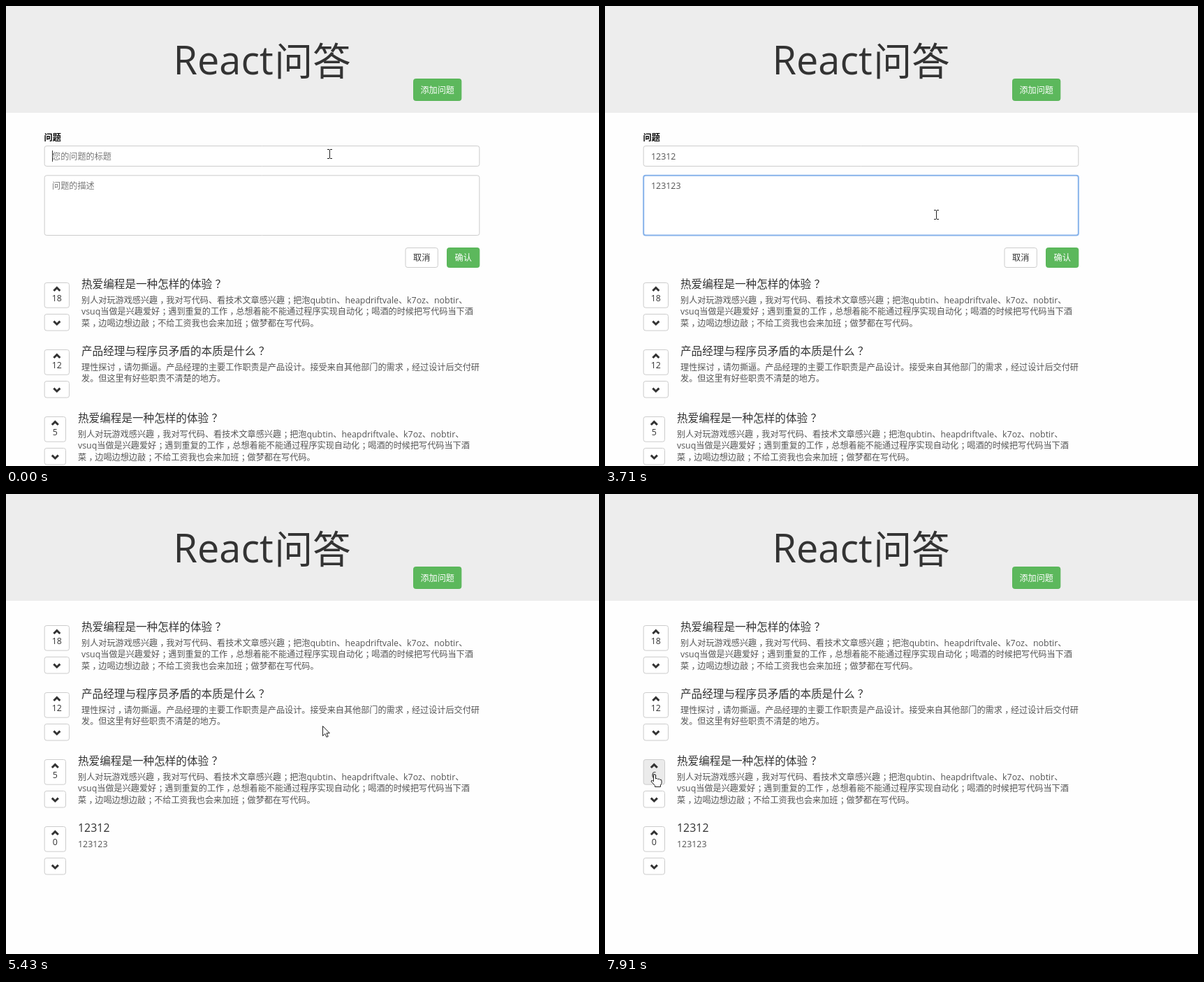
Write an HTML page with a canvas that moves like this. It is 849 px wide and 659 px high and loops after 8000 ms.

```html
<!DOCTYPE html>
<html lang="zh-CN">
<head>
<meta charset="utf-8">
<title>React问答</title>
<style>
html, body { margin: 0; width: 100%; height: 100%; overflow: hidden; background: #fefefe; }
canvas { display: block; }
</style>
</head>
<body>
<canvas id="stage" width="849" height="659"></canvas>
<script>
const ctx = document.getElementById('stage').getContext('2d');
const LOOP = 8000, SENT = 4770, BODY = 12.13, HEAD = 15.6, LEFT = 55.2;
const LATIN = '"Open Sans", "Noto Sans", sans-serif';
const HAN = '"Noto Sans CJK SC", "Noto Sans CJK", sans-serif';

const hobby = ['热爱编程是一种怎样的体验？', [
  '别人对玩游戏感兴趣，我对写代码、看技术文章感兴趣；把泡qubtin、heapdriftvale、k7oz、nobtir、',
  'vsuq当做是兴趣爱好；遇到重复的工作，总想着能不能通过程序实现自动化；喝酒的时候把写代码当下酒',
  '菜，边喝边想边敲；不给工资我也会来加班；做梦都在写代码。']];
const roles = ['产品经理与程序员矛盾的本质是什么？', [
  '理性探讨，请勿撕逼。产品经理的主要工作职责是产品设计。接受来自其他部门的需求，经过设计后交付研',
  '发。但这里有好些职责不清楚的地方。']];
const added = ['12312', ['123123']];

// Pointer moves: first step, last step, step count, waypoints
const moves = [
  [0, 0, 1, [[463, 212]]],
  [640, 1020, 4, [[463, 212], [463, 230]]],
  [1170, 1610, 4, [[463, 230], [446, 289]]],
  [3710, 4630, 7, [[446, 289], [644, 361]]],
  [SENT, SENT, 1, [[643, 361]]],
  [5070, 6010, 8, [[643, 361], [480, 324], [260, 385], [92, 485]]],
  [6130, 6270, 2, [[92, 485], [37, 330]]],
  [6409, 7100, 6, [[37, 330], [36, 275], [52, 232], [66, 295], [74, 358]]],
  [7240, 7240, 1, [[69, 401]]]
];

function pointer(t) {
  const [from, to, count, pts] = moves.filter(m => m[0] <= t).pop();
  const gap = (to - from) / (count - 1) || 1;
  const step = Math.min(count, Math.floor((t - from) / gap + 1e-6) + 1);
  const p = step / count * (pts.length - 1);
  const i = Math.max(0, Math.min(pts.length - 2, Math.floor(p)));
  const a = pts[i], b = pts[i + 1] || a;
  return a.map((v, k) => v + (b[k] - v) * (p - i));
}

// Draws mixed text: Latin runs slightly larger than Han, and the marks ，；？
// centred in their cells. Returns the width.
function text(s, x, y, size, color, { weight = 400, center = false } = {}) {
  const runs = s.match(/[\x20-\x7e]+|[，；？]|[^\x20-\x7e，；？]+/g) || [];
  const fontOf = r => r.charCodeAt(0) < 127
    ? `${weight} ${size * 1.023}px ${LATIN}` : `${weight} ${size}px ${HAN}`;
  const widths = runs.map(r => (ctx.font = fontOf(r), ctx.measureText(r).width));
  const total = widths.reduce((a, b) => a + b, 0);
  if (center) x -= total / 2;
  ctx.fillStyle = color;
  runs.forEach((r, i) => {
    ctx.font = fontOf(r);
    ctx.fillText(r, x + (/[，；？]/.test(r) ? size * .28 : 0), y);
    x += widths[i];
  });
  return total;
}

function box(x, y, w, h, fill = '#fff', line = '#ccc', width = 1) {
  ctx.beginPath();
  ctx.roundRect(x, y, w, h, 3);
  ctx.fillStyle = fill;
  ctx.fill();
  ctx.strokeStyle = line;
  ctx.lineWidth = width;
  ctx.stroke();
}

function button(label, x, y, w, h, green) {
  box(x, y, w, h, green ? '#5cb85c' : '#fff', green ? '#58b558' : '#ccc');
  text(label, x + w / 2, y + h / 2 + 4.6, BODY, green ? '#fff' : '#333', { center: true });
}

function chevron(x, y, dir) {
  ctx.beginPath();
  ctx.moveTo(x - 4.5, y + 2.2 * dir);
  ctx.lineTo(x, y - 2.2 * dir);
  ctx.lineTo(x + 4.5, y + 2.2 * dir);
  ctx.strokeStyle = '#333';
  ctx.lineWidth = 3;
  ctx.stroke();
}

function row([title, lines], votes, y, right, pressed) {
  const w = right - LEFT, mid = LEFT + w / 2, x = right + 17.5;
  box(LEFT, y + 188.5, w, 35.7, pressed ? '#ebebeb' : '#fff');
  chevron(mid, y + 197.8, 1);
  text(String(votes), mid, y + 215.3, BODY, '#333', { center: true });
  box(LEFT, y + 233.5, w, 23.5);
  chevron(mid, y + 245.8, -1);
  text(title, x, y + 196, HEAD, '#333');
  lines.forEach((s, i) => text(s, x, y + 217.5 + 16.5 * i, BODY, '#555'));
}

function field(value, hint, y, caret) {
  const w = text(value || hint, 66, y, BODY, value ? '#555' : '#777');
  if (!caret) return;
  ctx.fillStyle = '#333';
  ctx.fillRect(66 + Math.round(value && w), y - 12.5, 1, 16);
}

const typed = (s, t, times, chunk) => s.slice(0, chunk * times.filter(k => k <= t).length);
const within = (t, a, b) => t >= a && t < b;

function form(t) {
  const focus = within(t, 1610, 4630);
  text('问题', 54.5, 192.5, BODY, '#000', { weight: 700 });
  box(LEFT, 200.5, 622.6, 29);
  field(typed('12312', t, [780, 900, 1020, 1170, 1310], 1), '您的问题的标题', 219.5,
    t < 140 || within(t, 640, 1610));
  box(LEFT, 242.8, 622.6, 85.7, '#fff', focus ? '#86b2ea' : '#ccc', focus ? 2 : 1);
  field(typed('123123', t, [1860, 2000, 2150], 2), '问题的描述', 261.5,
    within(t, 1610, 2650) || within(t, 3210, 3710) || within(t, 4210, 4630));
  button('取消', 572, 346.5, 46.3, 28);
  button('确认', 631.5, 346.5, 46.3, 28, true);
}

const arrow = new Path2D('M.5.5V14.5L3.8 11.4 6 16.3 8.2 15.3 6 10.6H10.3Z');
const hand = new Path2D('M.5 1.8Q2-.6 3.5 1.8V7Q5.5 5.6 6.5 7.5 8.5 6.3 9.5 8.2 12.2 7.4 12 10V13.5L10.5 16V18.5H2.5V16.5L-2.8 11.2Q-2.8 8.5-.8 9.7L.5 11Z');

function shape(path) {
  ctx.fillStyle = '#fff';
  ctx.fill(path);
  ctx.strokeStyle = '#222';
  ctx.lineWidth = 1;
  ctx.stroke(path);
}

function ibeam() {
  ctx.strokeStyle = '#222';
  ctx.lineWidth = 1;
  ctx.stroke(new Path2D('M-3-6.5H0M1-6.5H4M.5-6V6M-3 6.5H0M1 6.5H4'));
}

function ring() {
  ctx.beginPath();
  ctx.arc(12.5, .5, 5.5, 0, 7);
  ctx.strokeStyle = '#5b929c';
  ctx.lineWidth = 3.4;
  ctx.stroke();
  ctx.beginPath();
  ctx.arc(12.5, .5, 5.5, .6, 3.9);
  ctx.strokeStyle = '#8fd9dc';
  ctx.lineWidth = 2;
  ctx.stroke();
}

function cursor(t) {
  const [x, y] = pointer(t).map(Math.round);
  const over = (l, top, r, b) => x > l && x < r && y > top && y < b;
  const open = t < SENT;
  ctx.save();
  ctx.translate(x, y);
  if (open && (over(54, 200, 679, 230) || over(54, 242, 679, 329))) ibeam();
  else if (open ? over(631, 346, 678, 375) : over(54, 380, 86, 417) || over(54, 233, 91, 257)) shape(hand);
  else {
    shape(arrow);
    if (within(t, SENT, 5070)) ring();
  }
  ctx.restore();
}

function draw(t) {
  ctx.fillStyle = '#fefefe';
  ctx.fillRect(0, 0, 849, 659);
  ctx.fillStyle = '#ededed';
  ctx.fillRect(0, 0, 849, 153);
  text('React', 239.5, 98, 54.6, '#333');
  text('问答', 384.5, 98.7, 54.6, '#333', { weight: 350 });
  button('添加问题', 583.5, 104.5, 68.3, 31, true);

  const open = t < SENT, top = open ? 208 : 0;
  if (open) form(t);
  row(hobby, 18, top, 90.5);
  row(roles, 12, top + 96, 90.5);
  row(hobby, t < 7910 ? 5 : 6, top + 192, 85.5, t >= 7780);
  if (!open) row(added, 0, 288, 85.5);
  cursor(t);
}

function tick(now) {
  draw(now % LOOP);
  requestAnimationFrame(tick);
}
requestAnimationFrame(tick);
</script>
</body>
</html>
```
